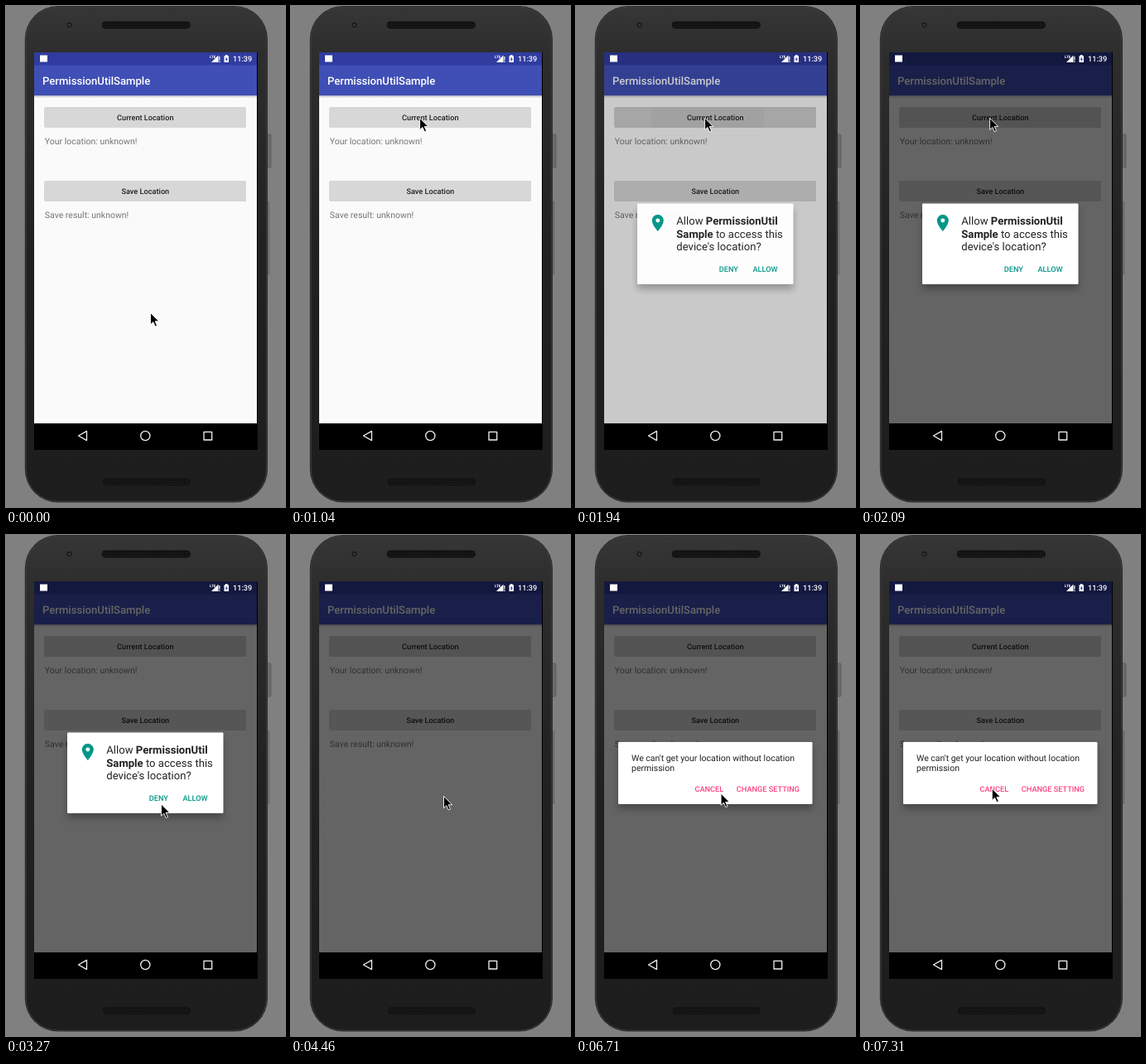
An HTML page that plays this animation: 337x605 px, repeating every 8000 ms.

```html
<!DOCTYPE html>
<html lang="en">
<head>
<meta charset="utf-8">
<title>Location permission demo</title>
<style>
  html, body { margin: 0; width: 100%; height: 100%; overflow: hidden; background: #808080; }
  svg { display: block; width: 100vw; height: 100vh; }
  text { font: 10.5px Roboto, sans-serif; white-space: pre; text-rendering: geometricPrecision; }
  .title { font-size: 13.12px; font-weight: 500; }
  .caps { font-size: 9.19px; font-weight: 500; }
  .large { font-size: 13.12px; }
  .card { filter: drop-shadow(0 6px 4px rgba(0, 0, 0, .27)); }
</style>
</head>
<body>
<svg viewBox="0 0 337 605">
  <defs>
    <linearGradient id="shell" x2="0" y2="1">
      <stop offset="0" stop-color="#363636"/>
      <stop offset=".1" stop-color="#2d2d2d"/>
      <stop offset=".5" stop-color="#212121"/>
      <stop offset="1" stop-color="#1d1d1d"/>
    </linearGradient>
    <linearGradient id="fall" x2="0" y2="1">
      <stop offset="0" stop-opacity=".28"/>
      <stop offset="1" stop-opacity="0"/>
    </linearGradient>
    <pattern id="mesh" width="3" height="3" patternUnits="userSpaceOnUse">
      <rect width="3" height="3" fill="#101010"/>
      <circle cx="1" cy="1" r=".7" fill="#2c2c2c"/>
    </pattern>
    <clipPath id="pressArea"><rect x="46.5" y="122" width="243.5" height="25" rx="2"/></clipPath>
  </defs>

  <!-- phone -->
  <g fill="#6c6c6c">
    <rect x="315" y="155" width="5" height="40" rx="1" stroke="#505050" stroke-width=".6"/>
    <rect x="315" y="236" width="3.500" height="89" rx="1"/>
  </g>
  <rect x="22.800" y="0" width="293.200" height="599.500" rx="40" fill="#242424"/>
  <rect x="24.200" y="1.200" width="290.400" height="597" rx="38.500" fill="url(#shell)" stroke="#434343" stroke-width=".8"/>
  <rect x="116" y="19" width="106.500" height="8" rx="4" fill="url(#mesh)" stroke="#111"/>
  <rect x="117" y="570.500" width="105.500" height="8" rx="4" fill="url(#mesh)" stroke="#111"/>
  <circle cx="76.500" cy="23" r="4" fill="#1c1c1c" stroke="#404040" stroke-width=".7"/>
  <circle cx="76.500" cy="23" r="1.600" fill="#333a44"/>
  <rect x="34" y="56" width="270" height="480"/>

  <!-- app -->
  <rect x="34" y="56" width="269" height="448" fill="#fafafa"/>
  <rect x="34" y="108" width="269" height="3" fill="url(#fall)"/>
  <rect x="34" y="71" width="269" height="37" fill="#3f4fb5"/>
  <rect x="34" y="56" width="269" height="15.500" fill="#303c9f"/>
  <text class="title" x="44" y="95" fill="#fff">PermissionUtilSample</text>
  <g fill="#d6d7d6" style="filter: drop-shadow(0 .6px .6px rgba(0, 0, 0, .3))">
    <rect x="46.500" y="122" width="243.500" height="25" rx="2"/>
    <rect x="46.500" y="211" width="243.500" height="25" rx="2"/>
  </g>
  <g clip-path="url(#pressArea)">
    <rect id="press" x="46" y="122" width="244" height="25"/>
    <circle id="ripple" cx="159" cy="135" opacity=".03"/>
  </g>
  <g text-anchor="middle" fill="#212121">
    <text class="caps" x="168.300" y="137.800">Current Location</text>
    <text class="caps" x="168.300" y="226.800">Save Location</text>
  </g>
  <g fill="#757575">
    <text x="46.800" y="166.500">Your location: unknown!</text>
    <text x="46.800" y="255.500">Save result: unknown!</text>
  </g>
  <rect id="dim" x="34" y="56" width="269" height="448"/>

  <!-- system bars -->
  <g fill="#fff">
    <rect x="41" y="59.500" width="9" height="8"/>
    <text x="246" y="62.500" style="font-size: 4.500px; font-weight: 700">LTE</text>
    <path d="M248 68L256.500 59.500V68z"/>
    <path d="M257.300 61h1.200v4.500h-1.200zm0 5.500h1.200V68h-1.200z"/>
    <path d="M263.500 60.300h1.500V59h2.500v1.300h1.500V68h-5.500z"/>
    <path d="M266.700 61.500l-2 3.200h1.300v2.300l2-3.300h-1.300z" fill="#303c9f"/>
    <text class="caps" x="274" y="67.300">11:39</text>
  </g>
  <g fill="none" stroke="#f2f2f2" stroke-width="1.300" stroke-linejoin="round">
    <path d="M87.500 519L97.500 513.400V524.600z"/>
    <circle cx="168.300" cy="519" r="5.600"/>
    <rect x="239" y="514.300" width="9.700" height="9.700"/>
  </g>

  <!-- dialogs -->
  <g id="ask">
    <rect class="card" x="74" y="238.500" width="188.500" height="97.500" rx="1.300" fill="#fff"/>
    <path transform="translate(86.800 250)" fill="#009688" d="M12 2C8.130 2 5 5.130 5 9c0 5.250 7 13 7 13s7-7.750 7-13c0-3.870-3.130-7-7-7zm0 9.500a2.500 2.500 0 0 1 0-5 2.500 2.500 0 0 1 0 5z"/>
    <g fill="#212121">
      <text class="large" x="121.300" y="264">Allow <tspan font-weight="700">PermissionUtil</tspan></text>
      <text class="large" x="121.300" y="279.500"><tspan font-weight="700">Sample</tspan> to access this</text>
      <text class="large" x="121.300" y="295">device's location?</text>
    </g>
    <rect id="deny" x="166" y="306" width="37" height="23" rx="1.300"/>
    <g fill="#009688">
      <text class="caps" x="172.800" y="321">DENY</text>
      <text class="caps" x="213.500" y="321">ALLOW</text>
    </g>
  </g>
  <g id="explain">
    <rect class="card" x="51" y="250" width="234.500" height="75" rx="1.300" fill="#fff"/>
    <g fill="#212121">
      <text x="67" y="272.800">We can't get your location without location</text>
      <text x="67" y="285.200">permission</text>
    </g>
    <g fill="#ff4081">
      <text class="caps" x="143.500" y="310.200">CANCEL</text>
      <text class="caps" x="193.800" y="310.200">CHANGE SETTING</text>
    </g>
  </g>

  <path id="cursor" d="M0 0V14.200L3.300 11.200L5.700 16.500L8 15.500L5.600 10.300H10.200z" stroke="#fff" stroke-width=".9"/>
</svg>
<script>
const LOOP = 8000, STEP = 146;
const start = [174.5, 370.5];
// [start time, steps, x, y]
const moves = [
  [600, 4, 155.6, 135.3],
  [2680, 5, 187.5, 325],
  [3416, 3, 184.5, 315.5],
  [6710, 5, 158.3, 306.2]
];
const el = id => document.getElementById(id);
const set = (id, name, value) => el(id).setAttribute(name, value);
const show = (id, opacity) => set(id, 'opacity', opacity);
const between = (t, from, to) => t >= from && t < to;

// value of the last [time, value] pair already reached
const hold = (t, pairs) => pairs.reduce((v, [at, next]) => t >= at ? next : v, 0);

function cursorAt(t) {
  let [x, y] = start;
  for (const [at, steps, toX, toY] of moves) {
    if (t < at) break;
    const u = Math.min(1, (Math.floor((t - at) / STEP) + 1) / steps);
    const eased = u * (2 - u);
    x += (toX - x) * eased;
    y += (toY - y) * eased;
  }
  return [x, y];
}

function draw(t) {
  set('cursor', 'transform', `translate(${cursorAt(t)})`);
  show('press', hold(t, [[1640, .02], [1790, .045], [2090, .03]]));
  set('ripple', 'r', hold(t, [[1640, 12], [1790, 32], [1940, 68], [2090, 0]]));
  show('dim', hold(t, [[1940, .195], [2090, .6]]));
  show('ask', hold(t, [[1940, .97], [2090, 1], [4460, 0]]));
  show('deny', between(t, 4310, 4460) ? .1 : 0);
  show('explain', hold(t, [[4610, .9], [4760, 1]]));
}

function tick() {
  draw(performance.now() % LOOP);
  requestAnimationFrame(tick);
}
tick();
</script>
</body>
</html>
```
